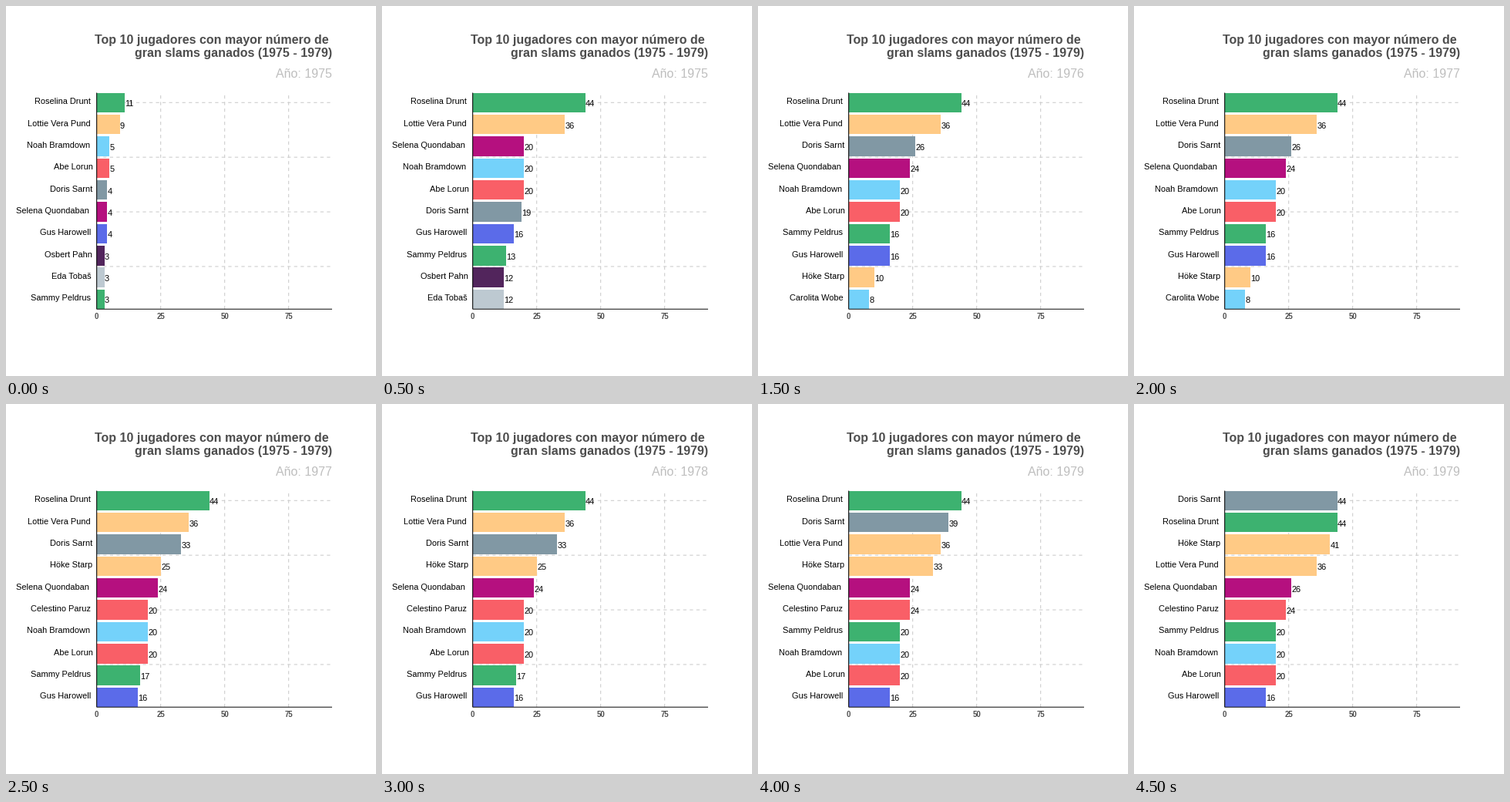
These frames come from a looping animation (480x480 px, 5000 ms). A matplotlib script:

```python
import matplotlib.pyplot as plt
from matplotlib.animation import FuncAnimation
from matplotlib.patches import Rectangle

SIZE, DPI = 480, 100
plt.rcParams["font.family"] = "Liberation Sans"

X0, X1, UNIT = 117.67, 423, 3.32
TOP, BOTTOM, ROW0, PITCH = 112.53, 393.25, 125.29, 28.355
GREY = "#4d4d4d"

GREEN, ORANGE, SKY, RED = "#3db270", "#ffca85", "#74d2fa", "#f95f67"
SLATE, MAGENTA, BLUE = "#8198a4", "#b5107f", "#5b6be9"
PURPLE, SILVER = "#52255c", "#bdc9d1"

# key: name, bar colour, right edge of the name
PLAYERS = {
    "a": ("Roselina Drunt", GREEN, 110),
    "b": ("Lottie Vera Pund", ORANGE, 110),
    "c": ("Noah Bramdown", SKY, 109),
    "d": ("Abe Lorun", RED, 113),
    "e": ("Doris Sarnt", SLATE, 112),
    "f": ("Selena Quondaban", MAGENTA, 108),
    "g": ("Gus Harowell", BLUE, 110),
    "h": ("Osbert Pahn", PURPLE, 112),
    "i": ("Eda Tobaš", SILVER, 111),
    "j": ("Sammy Peldrus", GREEN, 110),
    "k": ("Höke Starp", ORANGE, 112),
    "l": ("Carolita Wobe", SKY, 111),
    "m": ("Celestino Paruz", RED, 110),
}

# rankings from first to tenth place
RANKINGS = [r.split() for r in (
    "a11 b9 c5 d5 e4 f4 g4 h3 i3 j3",
    "a44 b36 f20 c20 d20 e19 g16 j13 h12 i12",
    "a44 b36 e26 f24 c20 d20 j16 g16 k10 l8",
    "a44 b36 e33 k25 f24 m20 c20 d20 j17 g16",
    "a44 e39 b36 k33 f24 m24 j20 c20 d20 g16",
    "e44 a44 k41 b36 f26 m24 j20 c20 d20 g16",
)]

fig = plt.figure(figsize=(SIZE / DPI, SIZE / DPI), dpi=DPI, facecolor="white")
ax = fig.add_axes([0, 0, 1, 1])
ax.set_xlim(0, SIZE)
ax.set_ylim(SIZE, 0)
ax.axis("off")


def pt(px):
    return px * 72 / DPI


def text(x, y, s, size=11, ha="right", **kw):
    return ax.text(x, y, s, fontsize=pt(size), ha=ha, va="baseline", **kw)


def line(xs, ys, color, z, style="-"):
    ax.plot(xs, ys, color=color, lw=pt(16 / 15), ls=style, zorder=z,
            snap=False, solid_capstyle="butt", dash_capstyle="butt")


DASH = (0, (4, 4))
for v in (25, 50, 75):
    x = X0 + v * UNIT
    line([x, x], [BOTTOM, TOP], "#cccccc", 1, DASH)
for k in range(4):
    y = ROW0 + 2.5 * k * PITCH
    line([X0, X1], [y, y], "#cccccc", 1, DASH)
line([X0, X0], [BOTTOM, TOP], "black", 3)
line([X0, X1], [BOTTOM, BOTTOM], "#1a1a1a", 3)

for v in (0, 25, 50, 75):
    text(X0 + v * UNIT, 406, str(v), 9.6, "center", weight="bold", color=GREY)

text(418.5, 49, "Top 10 jugadores con mayor número de", 16, weight="bold", color=GREY)
text(X1, 66, "gran slams ganados (1975 - 1979)", 16, weight="bold", color=GREY)
year = text(X1, 93, "", 16, color="#bebebe")

rows = []
for k in range(10):
    y = ROW0 + k * PITCH
    bar = Rectangle((X0, y - 0.45 * PITCH), 0, 0.9 * PITCH, lw=0, zorder=2)
    ax.add_patch(bar)
    name = text(0, y + 1.9, "", zorder=4)
    value = text(0, y + 4.9, "", ha="left", zorder=4)
    rows.append((bar, name, value))


def update(i):
    year.set_text(f"Año: {1975 + i // 2}")
    for (bar, name, value), entry in zip(rows, RANKINGS[(i + 1) // 2]):
        label, color, right = PLAYERS[entry[0]]
        width = int(entry[1:]) * UNIT
        bar.set_width(width)
        bar.set_facecolor(color)
        name.set_text(label)
        name.set_x(right)
        value.set_text(entry[1:])
        value.set_x(X0 + width + 0.4)
    return []


anim = FuncAnimation(fig, update, frames=10, interval=500,
                     init_func=lambda: update(0), repeat=True, repeat_delay=0)
plt.show()
```
